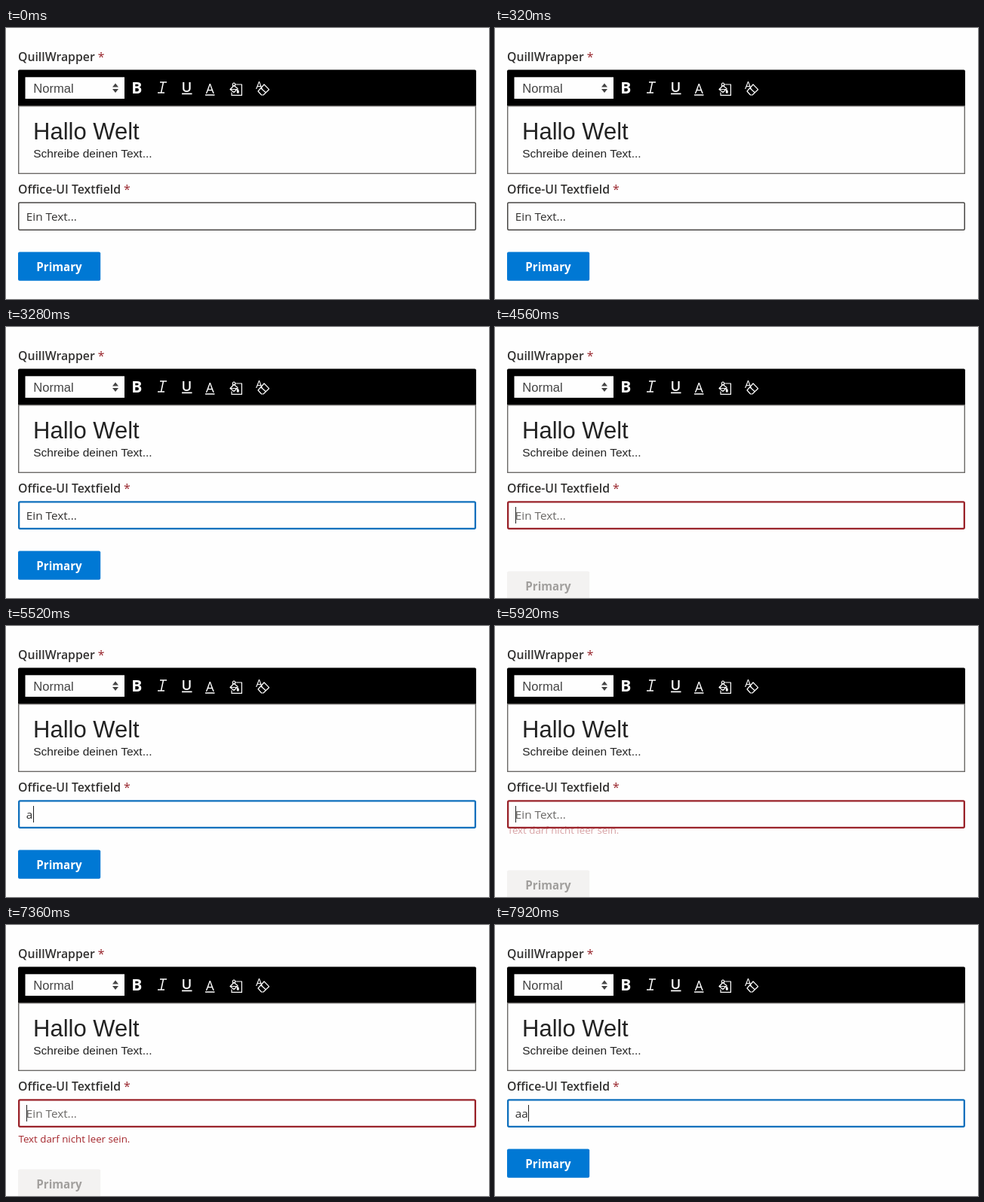
These frames come from a looping animation (640x360 px, 8 s). An HTML page:

```html
<!DOCTYPE html>
<html lang="de">
<head>
<meta charset="utf-8">
<title>Formular</title>
<style>
html, body { margin: 0; width: 100%; height: 100%; overflow: hidden; background: #fefefe; }
svg { display: block; width: 100vw; height: 100vh; }
text { font-family: "Open Sans", "Noto Sans", sans-serif; white-space: pre; }
.label { font-size: 15.8px; font-weight: 600; fill: #323130; }
.star { font-weight: 400; fill: #98252c; }
.arial { font-family: "Liberation Sans", Arial, sans-serif; fill: #222; }
.icon { fill: none; stroke: #fff; stroke-width: 1.2; stroke-linejoin: round; }
</style>
</head>
<body>
<svg viewBox="0 0 640 360">
  <text class="label" x="16" y="44.3">QuillWrapper <tspan class="star">*</tspan></text>

  <path d="M16 104V57.5Q16 55.5 18 55.5H621Q623 55.5 623 57.5V104Z"/>
  <rect x="16.7" y="103.7" width="605.6" height="89.6" fill="#fefefe" stroke="#6c6a68" stroke-width="1.4"/>
  <rect x="25.5" y="65.3" width="131.5" height="28.7" fill="#fefefe"/>
  <text class="arial" x="36.3" y="85.7" font-size="16.6" style="fill:#444">Normal</text>
  <path d="M141 78.5L145 73.5L149 78.5ZM141 81L145 86L149 81Z" fill="#444"/>
  <g fill="#fff">
    <text x="166.3" y="86.7" font-size="21" font-weight="700">B</text>
    <text x="232.5" y="84.5" font-size="18.5" font-weight="600">U</text>
    <text x="264.7" y="86.5" font-size="17.5">A</text>
    <path d="M233 86.6H246.5V88.2H233ZM264 88.3H276.5V89.7H264Z"/>
    <text x="331" y="80.5" font-size="14">A</text>
    <path d="M307 81Q310.5 85.500 307.500 87Q304 86 307 81Z"/>
  </g>
  <g class="icon">
    <path d="M204 72H213M201 86H210M208.5 72L205.5 86" stroke-width="1.5"/>
    <path d="M304 75H312.4V89.4H299V85.5M297 81.5L302 85.500L307 80.500L302 76.500ZM300.500 78V74Q302 72 303.500 74V78M297 81.500H306"/>
    <path d="M342 75L348.500 81.700L341 89H338.500L334 84ZM337.500 79.700L344.500 86"/>
  </g>
  <text class="arial" x="36" y="148" font-size="31">Hallo Welt</text>
  <text class="arial" x="36.2" y="172" font-size="15.5">Schreibe deinen Text...</text>

  <text class="label" x="16" y="219.6">Office-UI Textfield <tspan class="star">*</tspan></text>
  <rect id="field" fill="#fefefe" rx="1.5"/>
  <text id="value" x="26.8" y="256.3" font-size="15.3"></text>
  <path id="caret" stroke="#222"/>
  <text id="error" x="16.5" font-size="13.3" fill="#a4262c">Text darf nicht leer sein.</text>

  <g id="button">
    <rect id="face" x="16" y="297.6" width="109.2" height="38.2" rx="2"/>
    <text id="caption" x="70.5" y="323.4" font-size="15.1" font-weight="700" text-anchor="middle">Primary</text>
  </g>

  <path id="arrow" d="M0 0V18L4.2 14L7 20.8L10 19.5L7.2 13H13Z" fill="#fff" stroke="#000"/>
  <path id="beam" d="M-4 -11H-1L0 -10L1 -11H4M0 -10V10M-4 11H-1L0 10L1 11H4" fill="none" stroke="#000" stroke-width="1.2"/>
</svg>
<script>
const LOOP = 8000, STEP = 80, FOCUS = 2880, BLINK = 530;
const hint = "Ein Text...";
// [last key time, value, time the field became empty]
const keys = [
  [0, hint], [2690, hint],
  [3600, hint.slice(0, 10)], [3840, hint.slice(0, 9)], [4080, hint.slice(0, 8)],
  [4400, hint.slice(0, 5)], [4480, hint.slice(0, 2)],
  [4560, "", 4560], [4750, "", 4560], [5520, "a"], [5898, "", 5898],
  [6640, "a"], [7090, "", 7090], [7680, "a"], [7920, "aa"]
];
const el = id => document.getElementById(id);
const [field, value, caret, error, button, face, caption, arrow, beam] =
  ["field", "value", "caret", "error", "button", "face", "caption", "arrow", "beam"].map(el);

function set(node, attrs) {
  for (const k in attrs) node.setAttribute(k, attrs[k]);
}
const show = (node, on) => set(node, { visibility: on ? "visible" : "hidden" });
const clamp = x => Math.min(1, Math.max(0, x));

// cubic-bezier(.1, .9, .2, 1)
function slide(x) {
  const curve = (a, b, s) => 3 * a * s * (1 - s) ** 2 + 3 * b * s * s * (1 - s) + s ** 3;
  let lo = 0, hi = 1;
  for (let i = 0; i < 20; i++) {
    const mid = (lo + hi) / 2;
    if (curve(.1, .2, mid) < x) lo = mid; else hi = mid;
  }
  return curve(.9, 1, lo);
}

function drawField(t) {
  const [pressed, text, emptied] = keys.findLast(k => k[0] <= t);
  const empty = text === "", focused = t >= FOCUS;
  const w = focused ? 2.3 : 1.5;
  set(field, {
    x: 16 + w / 2, y: 231.2 + w / 2, width: 607 - w, height: 37.8 - w,
    "stroke-width": w, stroke: empty ? "#9a232a" : focused ? "#0f70bd" : "#484644"
  });
  value.textContent = text || hint;
  set(value, { fill: empty ? "#6b6967" : "#323130" });

  const x = Math.floor(27.8 + (empty ? 0 : value.getComputedTextLength())) + .5;
  set(caret, { d: `M${x} 239V261` });
  show(caret, focused && (t - pressed) % (2 * BLINK) < BLINK);

  const p = empty ? slide(clamp((t - emptied) / 367)) : 0;
  set(error, { y: 265.5 + 24 * p, opacity: p });

  set(button, { transform: `translate(0 ${empty ? 27 : 0})` });
  set(face, { fill: empty ? "#f3f2f1" : "#0078d4" });
  set(caption, { fill: empty ? "#a19f9d" : "#fff" });
}

function drawPointer(t) {
  const p = 1 - (1 - clamp((t - 2480) / 320)) ** 2;
  const x = 383 - 279 * p, y = 320 - 66 * p;
  const on = t >= 2480 && t < 3200, inside = y < 269;
  for (const node of [arrow, beam]) set(node, { transform: `translate(${x} ${y})` });
  show(arrow, on && !inside);
  show(beam, on && inside);
}

const start = performance.now();
function frame() {
  const t = Math.floor((performance.now() - start) % LOOP / STEP) * STEP;
  drawField(t);
  drawPointer(t);
  requestAnimationFrame(frame);
}
frame();
</script>
</body>
</html>
```
